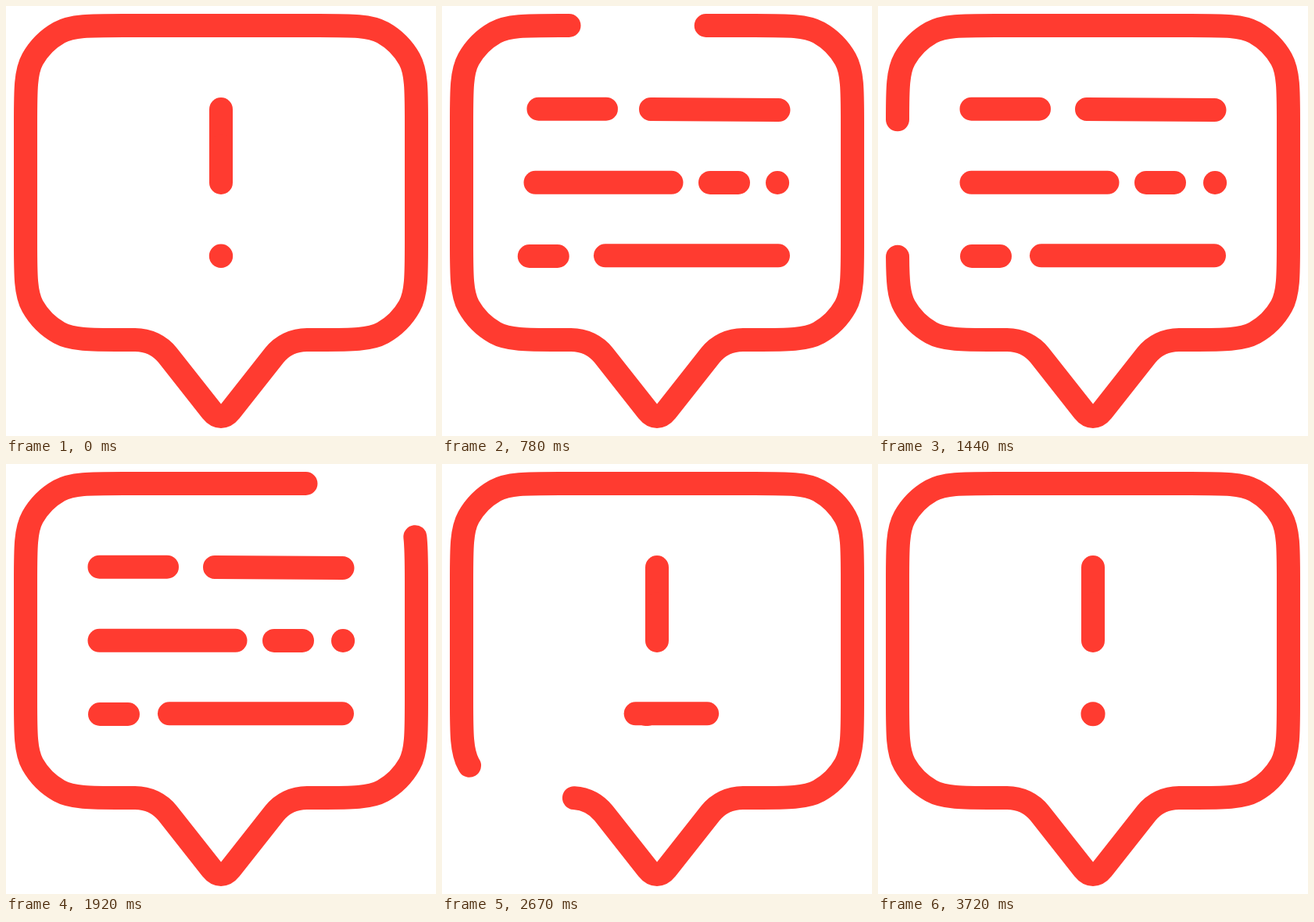
An HTML page with a canvas for the animation above (3.75 s loop, 550 px wide and 550 px high).

```html
<!DOCTYPE html>
<html lang="en">
<head>
<meta charset="utf-8">
<title>Message alert</title>
<style>
  html, body { margin: 0; width: 100%; height: 100%; overflow: hidden; background: #fff; }
  canvas { display: block; width: 550px; height: 550px; }
</style>
</head>
<body>
<canvas id="stage" width="550" height="550"></canvas>
<script>
const ctx = document.getElementById('stage').getContext('2d');
const LOOP = 3750, STEP = 30, RED = '#ff3b30', MID = 275;

// Right half of the bubble as a chain of cubic points, from the tip to the top centre.
const tail = [[275, 525], [279, 525], [283, 523], [287, 518], [287, 518], [343, 447], [343, 447],
  [353, 434.5], [368, 427], [385, 427], [385, 427], [400, 427]];
const corner = [[400, 427], [443, 427], [466, 427], [482, 418], [496.2, 410], [508, 398.2],
  [516, 384], [525, 368], [525, 345], [525, 302]];
const flipX = ([x, y]) => [550 - x, y];
const flipY = ([x, y]) => [x, 452 - y];
const upper = corner.map(flipY).reverse();
const right = [...tail, ...corner, [525, 302], [525, 150], ...upper, [400, 25], [275, 25], [275, 25]];
const left = right.map(flipX).reverse().slice(1);
const [start, ...curve] = [...right, ...left];
const outlineData = `M${start} C${curve.join(' ')}Z`;

const outline = new Path2D(outlineData);
const measure = document.createElementNS('http://www.w3.org/2000/svg', 'path');
measure.setAttribute('d', outlineData);
const LENGTH = measure.getTotalLength();

const clamp = v => Math.min(1, Math.max(0, v));
const smooth = v => { v = clamp(v); return v * v * (3 - 2 * v); };
const ramp = (t, from, span) => smooth((t - from) / span);

// Eased progress of the gap's three turns: solve the timing curve for its parameter.
function turn(t) {
  const X1 = 1308, X2 = 1020, END = 3464;
  if (t >= END) return 1;
  let lo = 0, hi = 1;
  for (let i = 0; i < 30; i++) {
    const u = (lo + hi) / 2, v = 1 - u;
    const x = 3 * v * v * u * X1 + 3 * v * u * u * X2 + u * u * u * END;
    if (x < t) lo = u; else hi = u;
  }
  return smooth(lo);
}

function line(x1, y1, x2, y2) {
  ctx.beginPath();
  ctx.moveTo(x1, y1);
  ctx.lineTo(x2, y2);
  ctx.stroke();
}

function dot(x, y, r) {
  ctx.beginPath();
  ctx.arc(x, y, r, 0, Math.PI * 2);
  ctx.fill();
}

function drawOutline(t) {
  const gap = LENGTH * 0.1 * ramp(t, 0, 600) * (1 - ramp(t, 2420, 1020));
  if (gap > 0.5) {
    const head = turn(t) * 3 * LENGTH + gap / 2;
    ctx.setLineDash([LENGTH - gap, gap]);
    ctx.lineDashOffset = -(head % LENGTH);
  }
  ctx.stroke(outline);
  ctx.setLineDash([]);
}

// Text strokes grow out of the centre column; drift is an offset that settles late.
const strokes = [
  { a: 119.5, b: 206, y: 131.7, inA: 208, inB: 177, out: 2270, drift: 4.8 },
  { a: 267, b: 430.5, y: 132, slope: 1, inA: 140, out: 2280 },
  { a: 119.5, b: 293.5, y: 225.8, inA: 195, out: 2370 },
  { a: 343, b: 379, y: 225.9, inA: 195, out: 2370 },
  { a: 431, b: 431.1, y: 226, inA: 249, out: 2340, drift: -2.4 },
  { a: 120, b: 156, y: 320, inA: 318, out: 2460, drift: -10 },
  { a: 209, b: 430, y: 319.3, inA: 275, out: 2525 }
];
const SPAN = 260;

function drawStroke(t, { a, b, y, inA, inB = inA, out, slope = 0, drift = 0 }) {
  if (t <= inB || t >= out + SPAN) return;
  const settle = drift * (1 - ramp(t, 540, 900));
  const shown = 1 - ramp(t, out, SPAN);
  const place = (x, from) => MID + (x + settle - MID) * ramp(t, from, SPAN) * shown;
  line(place(a, inA), y, place(b, inB), y + slope);
}

function drawMark(t) {
  const split = ramp(t, 60, 180) * (1 - ramp(t, 2480, 160));
  if (t < 480 || t > 2480) {
    const half = 47 * (1 - split);
    line(MID, 132, MID, 132 + half);
    line(MID, 226 - half, MID, 226);
    if (t > 240 && t < 480) {
      dot(MID, 132.5, 15.8);
      dot(MID, 226, 15.8);
    }
  }
  if (t < 390 || t > 2700) {
    const x = Math.max(0, (t - 2720) / 150);
    dot(MID, 319.7, 15.2 * (1 + x * Math.exp(1 - x)));
  }
}

function draw(t) {
  ctx.fillStyle = '#fff';
  ctx.fillRect(0, 0, 550, 550);
  ctx.fillStyle = ctx.strokeStyle = RED;
  ctx.lineWidth = 30;
  ctx.lineCap = ctx.lineJoin = 'round';
  drawOutline(t);
  drawMark(t);
  for (const s of strokes) drawStroke(t, s);
}

const origin = performance.now();
function frame() {
  const t = (performance.now() - origin) % LOOP;
  draw(Math.floor(t / STEP) * STEP);
  requestAnimationFrame(frame);
}
frame();
</script>
</body>
</html>
```
